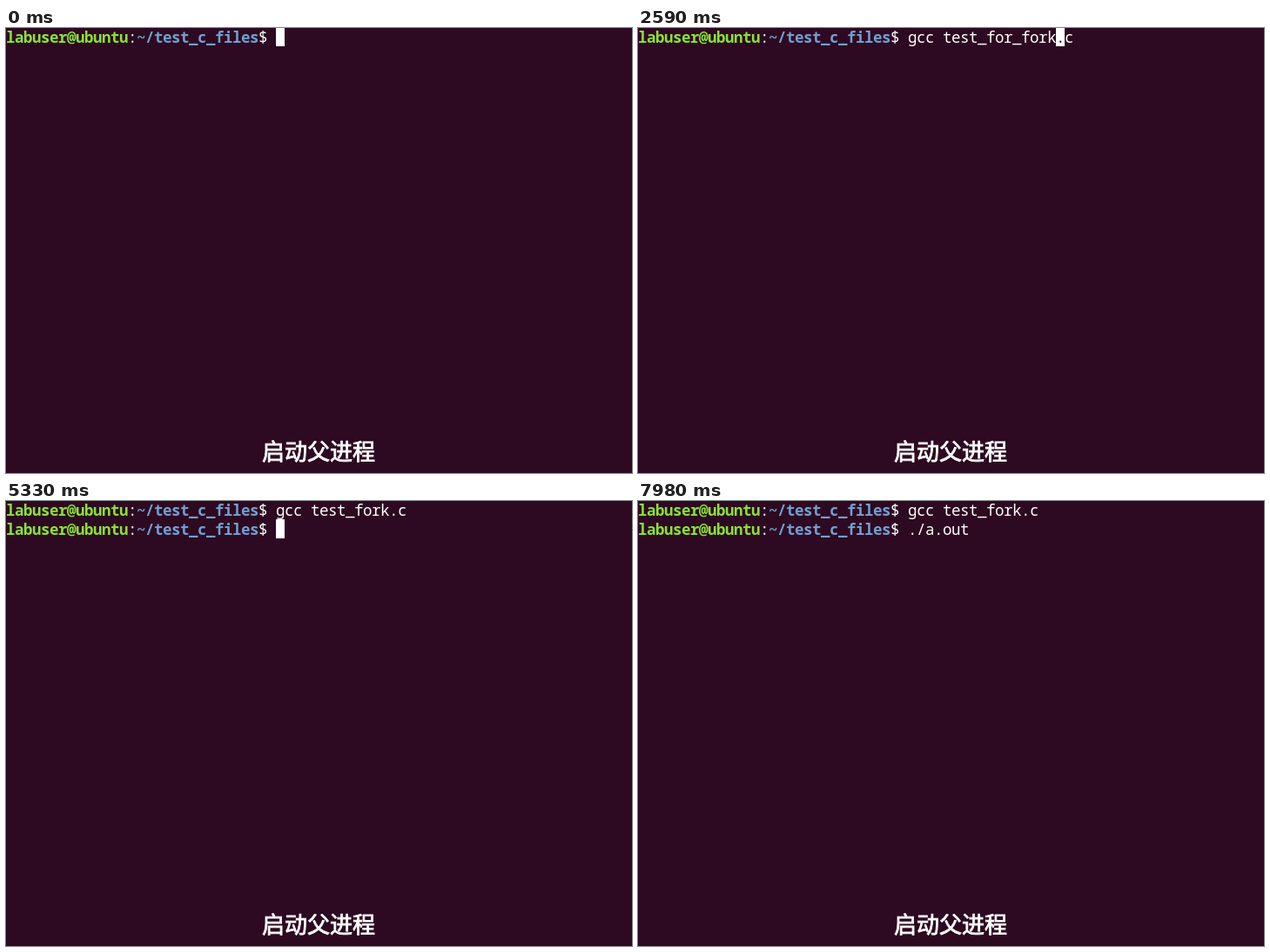
These frames come from a looping animation (719 px wide and 512 px high, 8 s). An HTML page:

```html
<!DOCTYPE html>
<html lang="zh">
<head>
<meta charset="utf-8">
<title>Terminal</title>
<style>
  html, body { margin: 0; width: 100%; height: 100%; overflow: hidden; background: #2d0a21; }
  svg { display: block; width: 100vw; height: 100vh; }
  .term { font: 17.5px "Noto Sans Mono", "DejaVu Sans Mono", monospace; letter-spacing: -.5px; fill: #fff; white-space: pre; }
  .user { fill: #8ae234; font-weight: 700; }
  .path { fill: #729fcf; font-weight: 700; }
  .term.under { fill: #2d0a21; }
  .caption { font: 26px "Noto Sans CJK SC", "Noto Sans CJK", sans-serif; fill: #fff; stroke: #fff; stroke-width: .8; }
</style>
</head>
<body>
<svg viewBox="0 0 719 512">
  <rect width="719" height="512" fill="#2d0a21"/>
  <g id="lines"></g>
  <rect id="cursor" width="10" fill="#fff"/>
  <text id="under" class="term under"></text>
  <g id="pointer" fill="none">
    <path d="M-3 -6.5H3M-3 6.5H3M0 -6.5V6.5" stroke="#14060f" stroke-width="3"/>
    <path d="M-2.5 -6.5H2.5M-2.5 6.5H2.5M0 -6.5V6.5" stroke="#eee"/>
  </g>
  <text class="caption" x="359" y="496.5" text-anchor="middle">启动父进程</text>
</svg>
<script>
const LOOP = 8000, CELL = 10, LEFT = 310;
const $ = id => document.getElementById(id);
const baseline = row => 17 + row * 22;

$('lines').innerHTML = [0, 1].map(row => `
  <g id="row${row}">
    <text class="term user" y="${baseline(row)}">labuser@ubuntu</text>
    <text class="term" x="140" y="${baseline(row)}">:</text>
    <text class="term path" x="150" y="${baseline(row)}">~/test_c_files</text>
    <text class="term" x="290" y="${baseline(row)}">$</text>
    <text class="term" id="cmd${row}" x="${LEFT}" y="${baseline(row)}"></text>
  </g>`).join('');

// Editing actions
const insert = str => s => {
  const cmd = s.cmds[s.row];
  s.cmds[s.row] = cmd.slice(0, s.col) + str + cmd.slice(s.col);
  s.col += str.length;
  s.lit = true;
};
const left = s => { s.col--; s.lit = true; };
const erase = s => {
  const cmd = s.cmds[s.row];
  s.cmds[s.row] = cmd.slice(0, s.col - 1) + cmd.slice(s.col);
  s.col--;
};
const enter = s => { s.row++; s.col = 0; };
const blink = s => { s.lit = !s.lit; };
const point = (x, y) => s => { s.mouse = [x, y]; };
const hide = s => { s.mouse = null; };

const script = [
  [330, point(499.5, 278)],
  [470, insert('gcc test_for_fork.c')],
  [540, hide],
  [1070, point(499.5, 277)],
  [1140, blink],
  [1730, blink],
  [2060, left],
  [2130, hide],
  [2590, left], [2620, left], [2660, left],
  [2880, left],
  [3260, left],
  [3790, erase], [3880, erase], [4070, erase], [4740, erase],
  [5330, enter],
  [5800, point(490.5, 268)],
  [5860, blink],
  [6190, point(491.5, 268)],
  [6320, insert('.')],
  [6390, hide],
  [6520, insert('/')],
  [6780, insert('a')],
  [6910, insert('.')],
  [7170, insert('o')], [7280, insert('u')], [7390, insert('t')],
  [7980, blink]
];

function stateAt(t) {
  const s = { cmds: ['', ''], row: 0, col: 0, lit: true, mouse: null };
  for (const [at, act] of script) if (at <= t) act(s);
  return s;
}

const show = (el, on) => el.setAttribute('visibility', on ? 'visible' : 'hidden');
const place = (el, attrs) => { for (const k in attrs) el.setAttribute(k, attrs[k]); };

function render(t) {
  const { cmds, row, col, lit, mouse } = stateAt(t);
  const x = LEFT + col * CELL;
  show($('row1'), row > 0);
  cmds.forEach((cmd, i) => { $('cmd' + i).textContent = cmd; });
  place($('cursor'), { x, y: row * 21, height: 21 + row });
  place($('under'), { x, y: baseline(row) });
  $('under').textContent = cmds[row][col] || '';
  show($('cursor'), lit);
  show($('under'), lit);
  show($('pointer'), mouse);
  if (mouse) place($('pointer'), { transform: `translate(${mouse})` });
}

const start = performance.now();
function tick() {
  render((performance.now() - start) % LOOP);
  requestAnimationFrame(tick);
}
tick();
</script>
</body>
</html>
```
